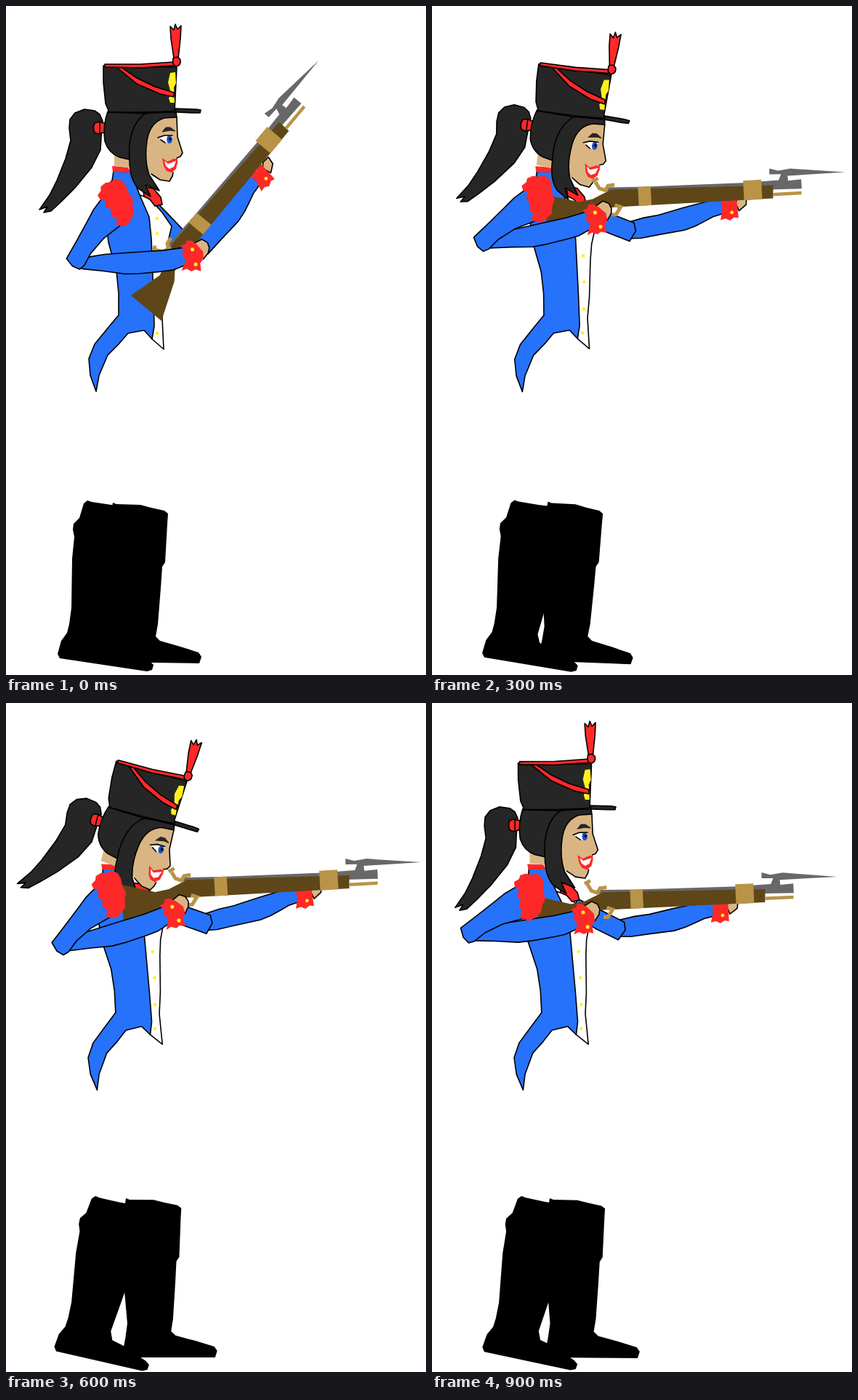
An HTML page that plays this animation: 578 by 920 pixels, repeating every 1 s.

```html
<!DOCTYPE html>
<html lang="en">
<head>
<meta charset="utf-8">
<title>Soldier taking aim</title>
<style>
html, body { margin: 0; width: 100%; height: 100%; overflow: hidden; background: #fff; }
svg { display: block; width: 100%; height: 100%; }
.blue { fill: #2672fb; }
.red { fill: #ff2828; }
.dark { fill: #262626; }
.skin { fill: #dab584; }
.wood { fill: #5e4618; }
.tan { fill: #b99347; }
.steel { fill: #686868; }
.gold { fill: #fff01e; }
.white { fill: #fff; }
.ink { stroke: #000; stroke-width: 1.6; stroke-linejoin: round; stroke-linecap: round; }
.line { fill: none; }
.brass { fill: none; stroke: #b99347; stroke-width: 5; }
</style>
</head>
<body>
<svg viewBox="0 0 578 920">
  <g id="backBoot">
    <path d="M112 680L107 684L101 704L93 712L92 720L94 730L91 760L90 828L87 850L84 862L76 873L71 891L74 897L194 915L201 913L203 906L198 901L165 882L150 876L147 864L159 820L180 740L185 690L145 686L118 682Z"/>
  </g>
  <g id="frontBoot">
    <path d="M147 683L152 685L185 686L200 690L218 694L223 698L222 712L219 765L215 771L213 800L209 850L206 867L212 873L240 881L265 889L269 895L266 904L203 903L145 902L139 894L143 875L146 855L142 800L138 740Z"/>
  </g>

  <g id="farForearm">
    <path class="skin ink" d="M416 282L422 276L432 275L431 286L421 294Z"/>
    <path class="blue ink" d="M262 306L290 299L310 296L345 287L385 278L400 279L400 297L385 301L375 306L360 313L345 318L310 323L285 327L264 327Z"/>
    <path class="red" d="M396 278L407 279L418 276L420 304L414 303L408 307L402 304L395 306L398 292Z"/>
    <circle class="gold" cx="411" cy="296" r="2.4"/>
  </g>
  <g id="farUpper">
    <path class="blue ink" d="M208 276L243 291L275 305L277 316L268 330L236 316L205 300Z"/>
  </g>

  <g id="torso">
    <path class="white ink" d="M184 260L197 264L215 284L228 303L222 328L220 350L218 400L215 430L217 472L201 458L190 300Z"/>
    <path class="blue ink" d="M148 227L146 240L136 250L136 280L141 325L152 365L155 395L155 425L140 443L122 465L114 485L116 508L124 530L128 508L140 480L155 465L168 450L190 446L201 458L204 440L203 400L200 320L197 290L184 260L172 228Z"/>
    <path class="red" d="M146 220L168 222L172 229L147 228Z"/>
    <path class="red ink" d="M188 248L203 251L213 263L215 273L205 275L198 266L190 262Z" stroke-width=".8"/>
    <g class="gold">
      <circle cx="208" cy="292" r="2.2"/><circle cx="208" cy="313" r="2.2"/>
      <circle cx="210" cy="344" r="2.2"/><circle cx="211" cy="380" r="2.2"/>
      <circle cx="210" cy="417" r="2.2"/><circle cx="208" cy="450" r="2.2"/>
    </g>
  </g>

  <g id="head">
    <path class="skin" d="M149 195H170V222L149 220Z"/>
    <path class="dark ink" d="M133 158L129 149L122 144L108 142L95 147L88 156L87 168L89 185L82 210L70 240L60 260L46 280L57 276L52 284L62 282L75 270L95 250L118 222L130 198L131 180Z"/>
    <path class="red ink" d="M122 161L128 159L135 161L139 160V176L134 174L127 176L122 174Q119 168 122 161M129 160V175"/>
    <path class="dark ink" d="M140 145Q133 165 136 186Q141 202 156 208L178 213L200 146Z"/>
    <path class="skin" d="M205 150L235 152L236 180L243 203L240 207L233 210L237 215L230 227L229 233L225 241L212 240L192 226L188 180Z"/>
    <path class="line ink" stroke-width="1" d="M235 153L236 180L243 202L240 207L235 209M230 229L229 234L225 241L212 239L200 231"/>
    <path class="dark ink" d="M234 146L235 153L218 154Q198 160 194 185Q190 212 197 232L211 254L192 246L199 262L182 251Q170 238 170 212Q168 190 174 172Q180 155 193 147Z"/>
    <path class="dark" stroke="#262626" stroke-width="1" d="M215 173L220 167L226 167L233 172L226 171Z"/>
    <path class="white" d="M211 182L219 178L229 179L228 187L219 188Z"/>
    <ellipse cx="225" cy="183.500" rx="3.800" ry="5.500" fill="#1a50c8"/>
    <circle cx="226" cy="183" r="1.800"/>
    <path class="line ink" d="M209 181L218 178L229 178M213 184L219 188"/>
    <path class="red" d="M215 209L222 214L231 210L236 210L236 215L234 224L228 229L221 227L217 220Z"/>
    <path class="white" d="M218 213L223 217L234 213L231 221L225 224L220 220Z"/>
    <path class="dark ink" d="M134 82L134 105L137 134L142 146L190 146L232 145L235 84Z"/>
    <path class="line ink" stroke-width="2.500" d="M140 146L190 148L234 144"/>
    <path class="dark ink" d="M233 141L262 142L268 143L267 147L258 147L234 146Z"/>
    <path class="gold" d="M226 92L233 91L234 106L231 112L232 133L226 133L224 127L227 120L223 105Z"/>
    <path class="red ink" d="M152 84L160 85L180 99L205 111L231 119L231 125L212 121L180 107Z"/>
    <path class="red ink" d="M136 80L185 80L231 77L237 82L215 83L185 85L136 84Z"/>
    <path class="red ink" stroke-width="1" d="M231 72L227 45L226 28L231 33L233 25L236 32L241 27L240 45L237 72Z"/>
    <path class="red ink" d="M230 72Q236 68 240 74Q241 82 234 83Q228 81 230 72Z"/>
  </g>

  <g id="rifle">
    <path class="steel" d="M-55 -15L0 -13L140 -11L177 -12L185 -12L188.600 -20L172.600 -20.800L173 -28.700L185 -25L202 -27L276.800 -18L197.500 -17.400L198 -10.500L216 -11.500V1.500L160 0L-50 -8Z"/>
    <path class="wood" d="M-137 -9.600L-91 3L-72 0L-46 -11.500L177 -5.500L176 12.500L-46 13L-72 15L-84 24L-137 45Z"/>
    <path class="tan" d="M-9 -13H8.500V13H-9ZM136 -14H161V13H136ZM176 5H215.500V9.500H176Z"/>
    <path class="brass" d="M-71 -24L-63 -28M-67 -23L-62 -14L-54 -11L-50 -17L-41 -18M-47 23L-41 23L-34 13L-42 10"/>
  </g>

  <g id="nearForearm">
    <path class="skin ink" d="M222 279L232 273L240 277L243 284L242 291L236 300Z"/>
    <path class="blue ink" d="M62 312L100 303L150 296L180 292L208 286L216 308L208 312L195 318L180 321L150 326L130 328L100 326L70 325Z"/>
    <path class="red" d="M203 284L210 281L212 276L218 276L226 281L235 290L236 300L232 306L234 317L226 315L221 318L214 315L207 318L212 304L206 295L209 290Z"/>
    <circle class="gold" cx="220" cy="288" r="2.600"/><circle class="gold" cx="226" cy="308" r="2.600"/>
  </g>
  <g id="nearUpper">
    <path class="blue" d="M134 252L115 262L100 273L75 291L52 307L55 320L62 328L70 326L85 315L110 304L142 297L152 275Z"/>
    <path class="line ink" d="M134 252L115 262L100 273L75 291L52 307L55 320L62 328L70 326L85 315L110 304L142 297"/>
    <path class="red" d="M128 247L135 243L137 238L145 236L152 238L160 237L167 243L169 251L168 262L170 272L165 282L163 291L155 297L148 301L142 300L134 296L138 287L133 281L136 272L131 266L135 258L129 254Z"/>
  </g>
</svg>
<script>
const times = [0, 200, 400, 600, 700, 900];

// Each part: pivot in its own drawing, then [x, y, degrees] at each key time.
const rig = {
  backBoot: { pivot: [112, 682], keys: [[112, 682, 0], [109, 681, 1.1], [118, 682, .8], [123, 680, 4.3], [133, 682, .3], [123, 680, 3.5]] },
  frontBoot: { pivot: [147, 684], keys: [[147, 684, 0], [157, 683, 2.3], [162, 682, .3], [165, 682, -1], [162, 682, -1.4], [162, 682, -.5]] },
  torso: { pivot: [166, 505], keys: [[166, 505, 0], [166, 505, 0], [166, 505, -1.5], [166, 505, -3], [166, 505, -6.7], [166, 505, -3]] },
  head: { pivot: [157, 225], keys: [[157, 225, 0], [156, 225, 0], [146, 224, 15], [137, 224, 15], [124, 227, -2.5], [142.5, 225.5, -.4]] },
  rifle: { pivot: [0, 0], keys: [[267, 299, -50.2], [290, 271, -3.1], [296, 252, -3.1], [296, 252, -3.1], [265, 233, -19.2], [282, 269.5, -2.6]] },
  farForearm: { pivot: [408, 292], keys: [[353, 236, -38.6], [408, 292, 0], [411, 268, -4], [411, 268, -4], [381, 217, -16.6], [397, 288, .8]] },
  farUpper: { pivot: [271, 317], keys: [[252, 335, 23], [271, 317, 0], [278, 304, -4], [278, 304, -4], [259, 284, -14], [260, 313, 3]] },
  nearForearm: { pivot: [221, 296], keys: [[257, 343, 4], [221, 296, 0], [231, 288, -9.2], [231, 288, -9.2], [207, 281, -16.2], [209, 296, -.7]] },
  nearUpper: { pivot: [62, 318], keys: [[97, 353, -25.5], [62, 318, 0], [76, 337, -17.5], [76, 337, -17.5], [56, 347, -19.5], [50, 320, -2.5]] }
};

for (const id in rig) rig[id].node = document.getElementById(id);

function pose(ms) {
  let i = 0;
  while (i < times.length - 2 && ms >= times[i + 1]) i++;
  const k = (ms - times[i]) / (times[i + 1] - times[i]);
  for (const { node, pivot, keys } of Object.values(rig)) {
    const [x, y, turn] = keys[i].map((v, n) => v + (keys[i + 1][n] - v) * k);
    node.setAttribute("transform",
      `translate(${x} ${y}) rotate(${turn}) translate(${-pivot[0]} ${-pivot[1]})`);
  }
}

const start = performance.now();
function tick() {
  const ms = (performance.now() - start) % 1000;
  pose(Math.min(Math.floor(ms / 50), 18) * 50);
  requestAnimationFrame(tick);
}
pose(0);
requestAnimationFrame(tick);
</script>
</body>
</html>
```
